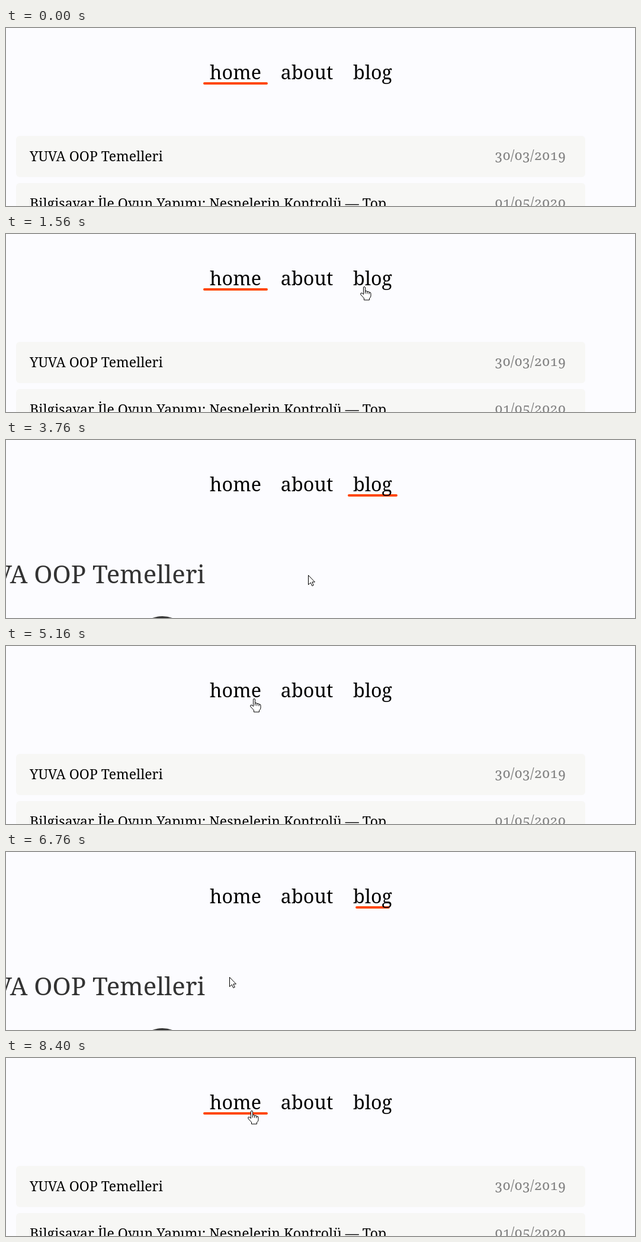
Write an HTML page that moves like this. It is 1062 px wide and 302 px high and loops after 9 s.

```html
<!DOCTYPE html>
<html lang="tr">
<head>
<meta charset="utf-8">
<style>
  html, body { margin: 0; width: 100%; height: 100%; overflow: hidden; background: #fcfcff; }
  svg { display: block; width: 100%; height: 100%; font-family: "Noto Serif", serif; }
  .nav { font-size: 32.3px; text-anchor: middle; }
  .title { font-size: 23px; }
  .date { font-size: 23px; text-anchor: end; fill: #808080; font-variant-numeric: oldstyle-nums; }
  .heading { font-size: 42px; text-anchor: end; fill: #333; }
  .row { fill: #f7f7f5; }
  #cursor path { fill: #fff; stroke: #000; stroke-linejoin: round; }
</style>
</head>
<body>
<svg viewBox="0 0 1062 302">
  <rect id="underline" y="92" height="4" rx="2" fill="#ff4500"/>
  <g class="nav">
    <text x="387.5" y="87">home</text>
    <text x="508" y="87">about</text>
    <text x="619" y="87">blog</text>
  </g>
  <g id="list">
    <g>
      <rect class="row" x="17" y="183" width="961" height="70" rx="6"/>
      <text class="title" x="40" y="226">YUVA OOP Temelleri</text>
      <text class="date" x="945" y="224">30/03/2019</text>
    </g>
    <g transform="translate(0 80)">
      <rect class="row" x="17" y="183" width="961" height="70" rx="6"/>
      <text class="title" x="40" y="226">Bilgisayar İle Oyun Yapımı: Nesnelerin Kontrolü — Top</text>
      <text class="date" x="945" y="224">01/05/2020</text>
    </g>
  </g>
  <g id="post">
    <text class="heading" x="336" y="243">YUVA OOP Temelleri</text>
    <circle id="picture" cx="264" cy="348" r="49" fill="#333"/>
  </g>
  <g id="cursor">
    <path id="arrow" d="M.5 .5V16.5L4.3 13 6.8 18.5 9.3 17.4 6.8 12H11.5Z"/>
    <path id="hand" d="M-1.5 2Q-1.5 .5 0 .5T1.5 2V8Q4.7 6.5 4.7 9 8 7.5 8 10 11 9 11 12V16Q11 19 8.5 20V23H-.5V20L-6 14Q-7 11 -5 11T-1.5 13.5ZM1.5 8V12M4.7 9V12.5M8 10V13"/>
  </g>
</svg>
<script>
const LOOP = 9000, GLIDE = 560, DELAY = 120, GROW = 320, PICTURE_DELAY = 240;
const home = { x: 387.5, width: 109 };
const blog = { x: 619, width: 84 };

// The cursor arrives at each stop, then clicks to open a page
const stops = [
  { arrive: -LOOP, click: -LOOP, x: 930, y: 310, page: 'list', link: home },
  { arrive: 1160, click: 1600, x: 605, y: 89, page: 'list', link: blog },
  { arrive: 2200, click: 2400, x: 510, y: 229, page: 'post', link: blog },
  { arrive: 4320, click: 5080, x: 419, y: 89, page: 'list', link: home },
  { arrive: 6360, click: 6440, x: 377, y: 212, page: 'post', link: blog },
  { arrive: 7640, click: 7960, x: 415, y: 89, page: 'list', link: home }
];

const el = id => document.getElementById(id);
const show = (id, on) => el(id).style.display = on ? '' : 'none';
const ease = (elapsed, duration) => {
  const k = Math.max(0, Math.min(1, elapsed / duration));
  return k * k * (3 - 2 * k);
};

function draw() {
  const t = performance.now() % LOOP;
  const { click, page, link } = stops.findLast(s => s.click <= t);
  show('list', page === 'list');
  show('post', page === 'post');
  show('picture', t >= click + PICTURE_DELAY);

  const width = link.width * ease(t - click - DELAY, GROW);
  el('underline').setAttribute('x', link.x - width / 2);
  el('underline').setAttribute('width', width);

  let { x, y } = stops[0];
  for (const stop of stops) {
    const k = ease(t - stop.arrive + GLIDE, GLIDE);
    x += (stop.x - x) * k;
    y += (stop.y - y) * k;
  }
  const hand = y < 97 || page === 'list' && y > 183;
  show('hand', hand);
  show('arrow', !hand);
  el('cursor').setAttribute('transform', `translate(${x} ${y})`);
  requestAnimationFrame(draw);
}
draw();
</script>
</body>
</html>
```
